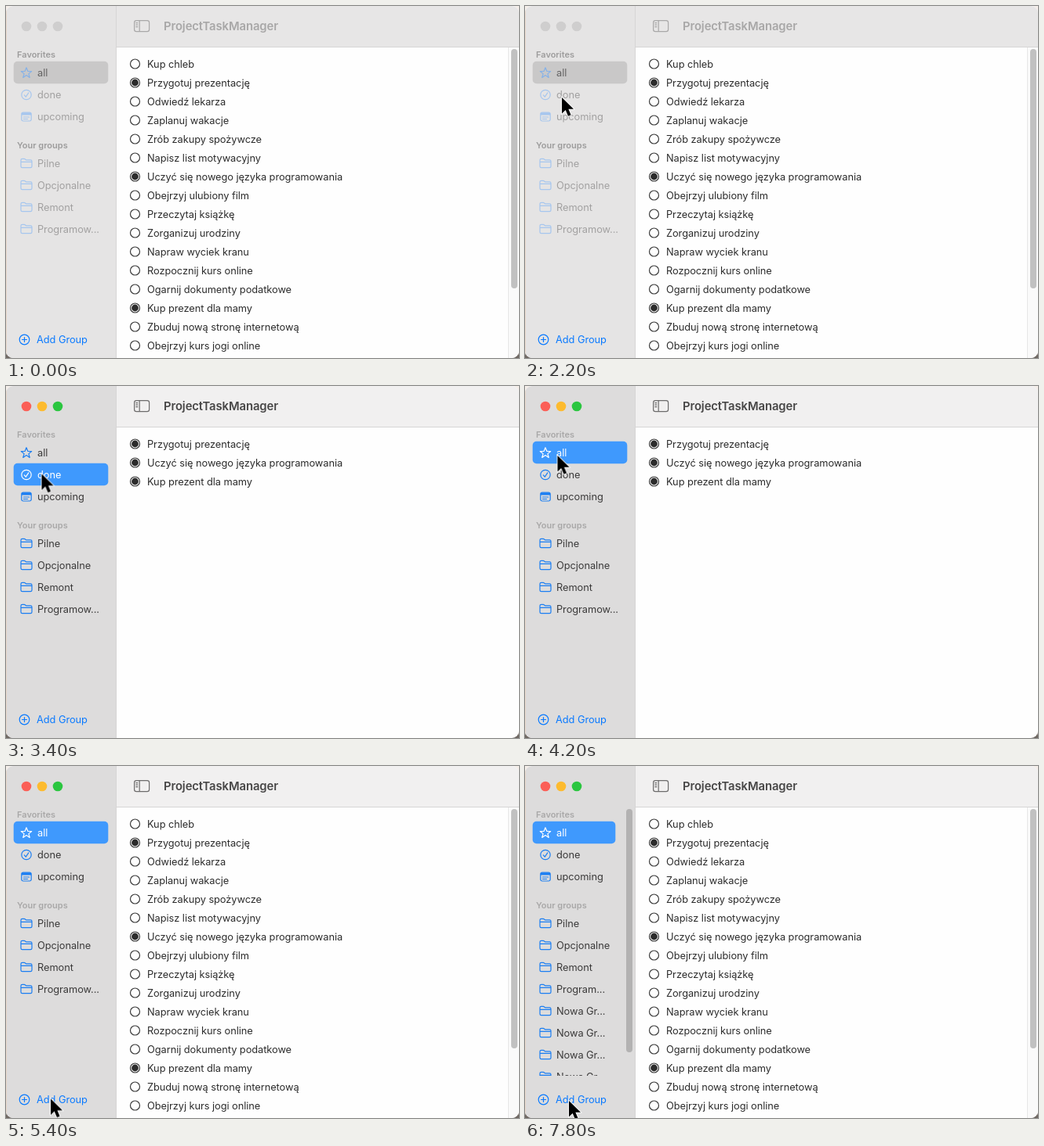
Write an HTML page that moves like this. It is 654 px wide and 450 px high and loops after 8 s.

```html
<!DOCTYPE html>
<html lang="pl">
<head>
<meta charset="utf-8">
<title>ProjectTaskManager</title>
<style>
html, body { margin: 0; width: 100%; height: 100%; overflow: hidden; }
body { background: linear-gradient(#f4eee9 440px, #6f6863 447px); }

svg {
  display: block; width: 654px; height: 450px;
  font: 12.8px Inter, sans-serif; letter-spacing: -.05px;
  --side: #e5e4e4; --bar: #e7e6e6; --edge: #d6d5d5;
  --title: #a8a7a7; --tool: #a9a8a8; --label: #9d9c9c;
  --ink: #a2a1a1; --icon: #a6c6ee;
  --all: #636262; --allIcon: #86b2e8; --done: #a2a1a1; --doneIcon: #a6c6ee;
  --pick: #c9c8c8; --red: #cfcece; --yellow: #cfcece; --green: #cfcece;
}
svg, svg .anim { animation: 8s step-end -10ms infinite; }
svg { animation-name: focus; }

@keyframes focus {
  35% {
    --side: #dddcdc; --bar: #f1f0f0; --edge: #d6d5d5;
    --title: #474646; --tool: #6d6c6c; --label: #a9a8a8;
    --ink: #3b3a3a; --icon: #1b7ef2;
    --all: #fff; --allIcon: #fff; --done: #3b3a3a; --doneIcon: #1b7ef2;
    --pick: #3f99fd; --red: #fb5f57; --yellow: #fdbb2f; --green: #2bc640;
  }
  40% { --all: #3b3a3a; --allIcon: #1b7ef2; --done: #fff; --doneIcon: #fff; }
  52.5% { --all: #fff; --allIcon: #fff; --done: #3b3a3a; --doneIcon: #1b7ef2; }
}

.pick { fill: var(--pick); width: 120.6px; animation-name: pick !important; }
@keyframes pick {
  40% { transform: translateY(28px); }
  52.5% { transform: none; }
  90% { width: 105.6px; }
}

.full { animation-name: full !important; }
.short { opacity: 0; animation-name: short !important; }
@keyframes full { 42.5% { opacity: 0; } 55% { opacity: 1; } }
@keyframes short { 42.5% { opacity: 1; } 55% { opacity: 0; } }

.wide { animation-name: wide !important; }
.narrow { opacity: 0; animation-name: narrow !important; }
@keyframes wide { 90% { opacity: 0; } }
@keyframes narrow { 90% { opacity: 1; } }

.new { opacity: 0; }
@keyframes add0 { 75% { opacity: .5; } 77.5% { opacity: 1; } }
@keyframes add1 { 80% { opacity: .5; } 82.5% { opacity: 1; } }
@keyframes add2 { 85% { opacity: .5; } 87.5% { opacity: 1; } }
@keyframes add3 { 90% { opacity: .5; } 92.5% { opacity: 1; } }

.cursor { transform: translate(300px, 480px); animation-name: move !important; }
@keyframes move {
  12.5% { transform: translate(291px, 427px); }
  15% { transform: translate(236px, 352px); }
  17.5% { transform: translate(166px, 264px); }
  20% { transform: translate(106px, 192px); }
  22.5% { transform: translate(66px, 144px); }
  25% { transform: translate(50px, 122px); }
  27.5% { transform: translate(47px, 117px); }
  30% { transform: translate(46px, 114px); }
  35% { transform: translate(45.5px, 112.5px); }
  47.5% { transform: translate(45px, 109px); }
  50% { transform: translate(42px, 94px); }
  52.5% { transform: translate(41.5px, 89px); }
  60% { transform: translate(43px, 127px); }
  62.5% { transform: translate(50px, 262px); }
  65% { transform: translate(56px, 392px); }
  67.5% { transform: translate(57px, 425.5px); }
  70% { transform: translate(57px, 427px); }
  97.5% { transform: translate(56px, 428px); }
}

.title { font-size: 14.8px; font-weight: 600; letter-spacing: -.08px; fill: var(--title); }
.label { font-size: 11px; font-weight: 600; letter-spacing: 0; fill: var(--label); }
.tasks { fill: #2c2c2c; color: #3c3c3c; }
.item { fill: var(--ink); color: var(--icon); }
.item.all { fill: var(--all); color: var(--allIcon); }
.item.done { fill: var(--done); color: var(--doneIcon); }
.add { fill: #0a7aff; color: #0a7aff; }
.line { fill: none; stroke: currentColor; stroke-width: 1.2; stroke-linejoin: round; stroke-linecap: round; }
</style>
</head>
<body>
<svg viewBox="0 0 654 450">
  <defs>
    <clipPath id="window"><rect width="654" height="450" rx="9"/></clipPath>
    <clipPath id="groups"><rect y="53" width="140" height="343"/></clipPath>
    <path id="star" class="line" d="M0-6.8 1.8-2.2 6.7-2 2.9 1.1 4.2 5.9 0 3.1-4.2 5.9-2.9 1.1-6.7-2-1.8-2.2Z"/>
    <path id="check" class="line" d="M-6.2 0a6.2 6.2 0 1 0 12.4 0a6.2 6.2 0 1 0-12.4 0M-2.7.4-.7 2.7 2.8-2.6"/>
    <g id="calendar">
      <rect class="line" x="-6.2" y="-5.5" width="12.4" height="11" rx="2"/>
      <path fill="currentColor" d="M-6-5.3H6V-2H-6Z"/>
      <path class="line" d="M-3.6.5H3.6M-3.6 3H1.5"/>
    </g>
    <path id="folder" class="line" d="M-7-4.4q0-1.7 1.7-1.7h2.6q.8 0 1.4.7t1.4.7H5.3q1.7 0 1.7 1.7V3.4q0 1.7-1.7 1.7H-5.3q-1.7 0-1.7-1.7ZM-7-2.2H7"/>
    <path id="plus" class="line" d="M-6.3 0a6.3 6.3 0 1 0 12.6 0a6.3 6.3 0 1 0-12.6 0M-3 0H3M0-3V3"/>
    <circle id="open" class="line" r="6"/>
    <g id="checked"><circle class="line" r="6"/><circle r="4.4"/></g>
  </defs>

  <g clip-path="url(#window)">
    <rect width="654" height="450" fill="#fefefe"/>
    <rect width="141" height="450" style="fill:var(--side)"/>
    <rect x="141" width="513" height="52" style="fill:var(--bar)"/>
    <path d="M140.5 0V450M141 52.5H654" style="stroke:var(--edge)"/>
    <path d="M.5 0V450" stroke="#e6d6c8"/>

    <circle cx="26" cy="26" r="6.3" style="fill:var(--red)"/>
    <circle cx="46" cy="26" r="6.3" style="fill:var(--yellow)"/>
    <circle cx="66" cy="26" r="6.3" style="fill:var(--green)"/>
    <g style="color:var(--tool)">
      <rect class="line" x="163.6" y="18.6" width="19" height="14" rx="2.6"/>
      <path class="line" d="M170.2 19V32.5M165.8 21.7h2M165.8 24.2h2M165.8 26.7h2"/>
    </g>
    <text class="title" x="201" y="31">ProjectTaskManager</text>

    <text class="label" x="14" y="65.5">Favorites</text>
    <rect class="pick anim" x="9.7" y="70.7" height="28.6" rx="5"/>
    <text class="label" x="14" y="181.5">Your groups</text>
    <g id="side" clip-path="url(#groups)"></g>
    <rect class="narrow anim" x="129" y="55" width="8" height="311" rx="4" fill="#b3b2b2"/>
    <g class="add">
      <use href="#plus" x="23.5" y="426.5"/>
      <text x="39" y="431">Add Group</text>
    </g>

    <g class="tasks full anim">
      <rect x="640" y="53" width="14" height="397" fill="#fafafa"/>
      <path d="M640.5 53V450" stroke="#e6e6e6"/>
      <rect x="644" y="55" width="8" height="306" rx="4" fill="#c1c1c1"/>
      <g id="full"></g>
    </g>
    <g class="tasks short anim" id="short"></g>
  </g>

  <path class="cursor anim" d="M0 0V20.5L4.7 16 8 23.8 11.6 22.2 8.4 14.7H15Z"
    stroke="#fff" stroke-width="1.6" paint-order="stroke"/>
</svg>
<script>
const byId = id => document.getElementById(id);
const icon = (name, x, y) => `<use href="#${name}" x="${x}" y="${y}"/>`;
const text = (s, x, y, cls = '') => `<text class="${cls}" x="${x}" y="${y}">${s}</text>`;

// A leading asterisk marks a finished task.
const tasks = [
  'Kup chleb', '*Przygotuj prezentację', 'Odwiedź lekarza', 'Zaplanuj wakacje',
  'Zrób zakupy spożywcze', 'Napisz list motywacyjny',
  '*Uczyć się nowego języka programowania', 'Obejrzyj ulubiony film',
  'Przeczytaj książkę', 'Zorganizuj urodziny', 'Napraw wyciek kranu',
  'Rozpocznij kurs online', 'Ogarnij dokumenty podatkowe', '*Kup prezent dla mamy',
  'Zbuduj nową stronę internetową', 'Obejrzyj kurs jogi online'
];
const isDone = t => t[0] === '*';
const taskRow = (t, i) => {
  const y = 74 + 24 * i;
  return icon(isDone(t) ? 'checked' : 'open', 164.5, y) + text(t.replace('*', ''), 180, y + 5);
};
byId('full').innerHTML = tasks.map(taskRow).join('');
byId('short').innerHTML = tasks.filter(isDone).map(taskRow).join('');

// Long names get a shorter form once the scrollbar takes its space.
const sideRow = (name, glyph, y, cls = '', cut = '', style = '') =>
  `<g class="item ${cls}" style="${style}">${icon(glyph, 26, y)}` +
  (cut ? text(name, 40, y + 4.5, 'wide anim') + text(cut, 40, y + 4.5, 'narrow anim')
       : text(name, 40, y + 4.5)) + '</g>';
const groupY = i => 201.5 + 28 * i;

byId('side').innerHTML = [
  sideRow('all', 'star', 85.5, 'all'),
  sideRow('done', 'check', 113.5, 'done'),
  sideRow('upcoming', 'calendar', 141.5),
  ...['Pilne', 'Opcjonalne', 'Remont'].map((g, i) => sideRow(g, 'folder', groupY(i))),
  sideRow('Programow...', 'folder', groupY(3), '', 'Program...'),
  ...[0, 1, 2, 3].map(i => sideRow('Nowa Grupa', 'folder', groupY(4 + i),
    'new anim', 'Nowa Gr...', `animation-name:add${i}`))
].join('');
</script>
</body>
</html>
```
